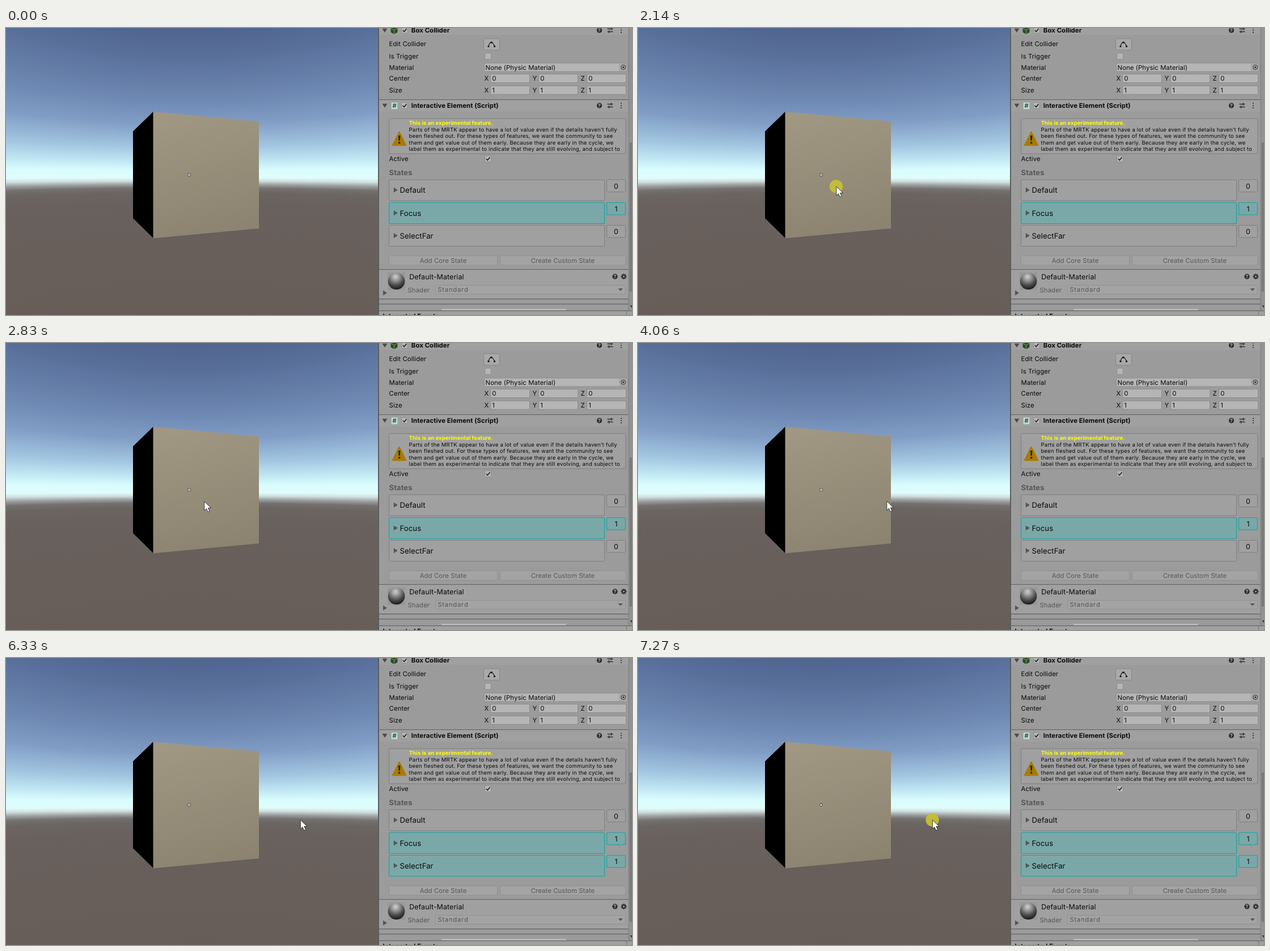
An HTML page with a canvas for the animation above (8000 ms loop, 1104 by 507 pixels).

```html
<!DOCTYPE html>
<html lang="en">
<head>
<meta charset="utf-8">
<title>Inspector states</title>
<style>
html, body { margin: 0; width: 100%; height: 100%; overflow: hidden; background: #9b9b9b; }
canvas, svg { position: absolute; left: 0; top: 0; display: block; }
text { font-family: Inter, Roboto, sans-serif; font-size: 11.4px; letter-spacing: .06px; fill: #0a0a0a; white-space: pre; text-rendering: geometricPrecision; }
.bold { font-weight: 700; }
.big { font-size: 13.2px; }
.note { font-size: 9.5px; letter-spacing: .2px; }
.dim { fill: #585858; }
.mid { text-anchor: middle; }
.field { fill: #b5b5b5; stroke: #8b8b8b; }
.button { fill: #a9a9a9; stroke: #868686; }
.off { fill: #a3a3a3; stroke: #919191; }
.box { fill: #a0a0a0; stroke: #7e7e7e; }
.on { fill: #7aa8a8; stroke: #1ba3a3; stroke-width: 1.2; }
</style>
</head>
<body>
<canvas id="sky" width="657" height="507"></canvas>
<svg id="stage" width="1104" height="507" viewBox="0 0 1104 507"></svg>
<script>
const LOOP = 8000, HORIZON = 259.5, CENTER = 323, FOCAL = 450;
const el = id => document.getElementById(id);

// Sky colours by height; each column is scaled for the camera's perspective.
function paintSky() {
  const g = el('sky').getContext('2d');
  const fill = g.createLinearGradient(0, -340, 0, 320);
  const stops = [[-340, '#4d628b'], [-259, '#586f9a'], [-160, '#6e89b3'], [-110, '#819dc5'],
    [-60, '#a2c6e0'], [-28, '#c2e8f4'], [-10, '#d9fdfd'], [6, '#e0fcfc'], [13, '#cfdfdf'],
    [20, '#a0a3a3'], [28, '#747170'], [38, '#6b6562'], [60, '#69615d'], [320, '#665c58']];
  for (const [y, c] of stops) fill.addColorStop((y + 340) / 660, c);
  g.fillStyle = fill;
  for (let x = 0; x < 657; x++) {
    const k = Math.hypot(FOCAL, x - CENTER) / Math.hypot(FOCAL, CENTER);
    g.setTransform(1, 0, 0, k, x, HORIZON);
    g.fillRect(0, -400, 1, 800);
  }
}

const text = (x, y, s, cls = '', more = '') => `<text x="${x}" y="${y}" class="${cls}" ${more}>${s}</text>`;
const rect = (x, y, w, h, cls, id = '') =>
  `<rect x="${x + .5}" y="${y + .5}" width="${w - 1}" height="${h - 1}" rx="2" class="${cls}" id="${id}"/>`;
const fillRect = (x, y, w, h, c) => `<rect x="${x}" y="${y}" width="${w}" height="${h}" fill="${c}"/>`;
const path = (d, fill = 'none', more = '') => `<path d="${d}" fill="${fill}" ${more}/>`;
const circle = (x, y, r, fill, more = '') => `<circle cx="${x}" cy="${y}" r="${r}" fill="${fill}" ${more}/>`;
const down = (x, y) => path(`M${x - 4.5} ${y - 3.5}h9l-4.5 7z`, '#4b4b4b');
const right = (x, y) => path(`M${x - 3.5} ${y - 4.5}v9l7-4.5z`, '#555');
const line = y => fillRect(658, y, 440, 1.3, '#646464');

const check = (x, y, ticked = true) => rect(x - 6, y - 6, 12, 12, 'field') +
  (ticked ? path(`M${x - 3.2} ${y}l2.4 2.5 4.3-5.2`, 'none', 'stroke="#222" stroke-width="1.6"') : '');

const help = (x, y) => circle(x, y, 4.7, '#303030') +
  text(x, y + 3, '?', 'bold mid', 'style="font-size:8.5px;fill:#b5b5b5"');

const headerIcons = y => help(1046.5, y) +
  path(`M1060.5 ${y - 2.5}h10M1060.5 ${y + 2.5}h10M1067.5 ${y - 5}v5M1063.5 ${y}v5`, 'none', 'stroke="#303030" stroke-width="1.3"') +
  [-4, 0, 4].map(d => circle(1085, y + d, 1.1, '#303030')).join('');

const vector = (y, name, value) => text(675.6, y + 4.2, name) +
  ['X', 'Y', 'Z'].map((axis, i) => {
    const x = 854 + 85 * i;
    return text(x - 10.5, y + 4.2, axis) + rect(x, y - 7.5, 70, 16, 'field') + text(x + 3.2, y + 4.2, value);
  }).join('');

const state = (y, name, value, cls) => rect(675, y, 381, 38, cls, name) + right(687.3, y + 18.7) +
  text(694.4, y + 23.6, name, 'big') + rect(1059, y, 34, 22.5, cls, name + 'Box') +
  text(1076, y + 16.2, value, 'mid', `id="${name}Value" style="font-size:12.4px"`);

function gear(x, y) {
  let d = '';
  for (let i = 0; i < 8; i++) {
    const a = i * Math.PI / 4;
    d += `M${x} ${y}L${x + 5 * Math.cos(a)} ${y + 5 * Math.sin(a)}`;
  }
  return path(d, 'none', 'stroke="#303030" stroke-width="2"') + circle(x, y, 3.6, '#303030') + circle(x, y, 1.6, '#a0a0a0');
}

const scene = () =>
  path('M224 182.5L260 147.5V371.5L224 336z', '#000') +
  path('M259.5 148L446 165V354L259.5 371.5z', 'url(#face)') +
  `<g id="ring">${circle(CENTER, HORIZON, 2.9, '#222')}${circle(CENTER, HORIZON, 2.2, '#fff')}${circle(CENTER, HORIZON, 1, '#222')}</g>` +
  `<g id="dot">${circle(CENTER, HORIZON, 2.4, '#222')}${circle(CENTER, HORIZON, 1.6, '#fff')}</g>`;

const colliderSection = () =>
  fillRect(658, 0, 440, 12, '#a0a0a0') + down(668, 4.5) +
  path('M684.5 -3l6 3.2v7.4l-6 3.4-6-3.4V.2z', '#2d4a26') +
  path('M678.5 .5l6 3.2 6-3.2M684.5 3.7V11', 'none', 'stroke="#7da06f" stroke-width="1"') +
  check(703, 4) + text(714.8, 8, 'Box Collider', 'bold') + headerIcons(4) +
  text(675.6, 31.5, 'Edit Collider') + rect(842, 18.5, 29, 21, 'button') +
  path('M851 32.5q1-6 4.5-7.5M857 25.5q2.5 1.5 4.5 7', 'none', 'stroke="#1b1b1b" stroke-width="1.2"') +
  [[851, 32.5], [856, 25.5], [861.5, 32.5]].map(([x, y]) => fillRect(x - 1.5, y - 1.5, 3, 3, '#1b1b1b')).join('') +
  text(675.6, 54.2, 'Is Trigger') + check(850, 50, false) +
  text(675.6, 73.7, 'Material') + rect(843, 61.5, 254, 16, 'field') + text(845.5, 73.7, 'None (Physic Material)') +
  fillRect(1081, 62.5, 15, 14, '#a6a6a6') +
  circle(1088.7, 69.3, 4, 'none', 'stroke="#2d2d2d"') + circle(1088.7, 69.3, 1.5, '#2d2d2d') +
  vector(88.5, 'Center', '0') + vector(109.3, 'Size', '1');

const note = ['Parts of the MRTK appear to have a lot of value even if the details haven’t fully',
  'been fleshed out. For these types of features, we want the community to see',
  'them and get value out of them early. Because they are early in the cycle, we',
  'label them as experimental to indicate that they are still evolving, and subject to'];

const elementSection = () =>
  line(126) + fillRect(658, 127.3, 440, 20, '#a0a0a0') + down(668, 137.2) +
  `<rect x="679" y="131" width="12" height="13" rx="1.5" fill="#c3d8d1" stroke="#7e9b90" stroke-width=".8"/>` +
  text(685, 141.3, '#', 'bold mid', 'style="fill:#1c5a48;font-size:11px"') +
  check(703, 137) + text(714.8, 141.2, 'Interactive Element (Script)', 'bold') + headerIcons(137) +
  rect(675, 159.5, 418.5, 63, 'box') +
  path('M693.5 184l11.5 23h-23z', '#a87c00', 'stroke="#a87c00" stroke-width="2.5" stroke-linejoin="round"') +
  path('M692 190h3.4l-.6 9h-2.2zM692.2 201.2h3v3h-3z', '#1e1a10') +
  text(710.7, 171.2, 'This is an experimental feature.', 'bold', 'style="font-size:9.5px;fill:#ff0"') +
  note.map((s, i) => text(710.6, 182.6 + 11.5 * i, s, 'note')).join('') +
  text(675.6, 235.3, 'Active') + check(850, 231) +
  text(675.6, 259.8, 'States', 'bold dim', 'style="font-size:13px"') +
  state(267.5, 'Default', 0, 'box') + state(308, 'Focus', 1, 'on') + state(348, 'SelectFar', 0, 'box') +
  rect(675, 402, 192, 17.5, 'off') + text(771, 415.2, 'Add Core State', 'mid dim') +
  rect(871, 402, 222.5, 17.5, 'off') + text(982, 415.2, 'Create Custom State', 'mid dim');

const materialSection = () =>
  line(426) + fillRect(658, 427.3, 440, 51, '#a0a0a0') +
  fillRect(673, 432, 31, 31, '#979797') + circle(688.5, 447.3, 14.8, 'url(#ball)') + right(668.5, 468) +
  text(711.2, 444.2, 'Default-Material', '', 'style="font-size:12.5px"') +
  text(708.5, 466.5, 'Shader', 'dim') + rect(757, 454, 336, 16.5, 'off') +
  text(761.3, 466.3, 'Standard', 'dim', 'style="letter-spacing:.7px"') +
  path('M1079.5 460h8.5l-4.2 4.5z', '#555') + help(1074, 439) + gear(1089.5, 439) +
  line(478) + line(487) + fillRect(768, 496, 219.5, 3, '#b9b9b9') +
  fillRect(658, 499.3, 446, 8, '#a0a0a0') + fillRect(658, 498.9, 446, 1.2, '#646464') +
  text(664.5, 513.2, 'Integrated Events', 'bold');

const scrollbar = () =>
  fillRect(1098, 0, 6, 499, '#929292') + fillRect(1097.5, 0, 1, 499, '#7f7f7f') +
  `<rect x="1099.5" y="202" width="8" height="264" rx="3" fill="#7a7a7a"/>` +
  path('M1100.5 490h6l-3 4z', '#333') + fillRect(1094, 500, 1, 7, '#777');

const pointer = () => `<g id="pointer">${circle(0, 0, 11.7, '#c6bf34', 'id="press"')}` +
  path('M.3 0V16L4 12.6 6.6 18.5 9.5 17.2 6.9 11.5H12z', '#fff', 'stroke="#252525" stroke-width=".9" stroke-linejoin="round"') + '</g>';

function build() {
  el('stage').innerHTML = `<defs>
    <linearGradient id="face" x1=".2" y1="0" x2=".4" y2="1"><stop stop-color="#a09883"/><stop offset="1" stop-color="#8c8470"/></linearGradient>
    <radialGradient id="ball" cx=".45" cy=".24" r=".74"><stop stop-color="#d0d0d0"/><stop offset=".32" stop-color="#959595"/><stop offset=".68" stop-color="#4c4c4c"/><stop offset="1" stop-color="#1c1c1c"/></radialGradient>
  </defs>` + scene() + fillRect(656.5, 0, 448, 507, '#9b9b9b') + fillRect(656, 0, 2, 507, '#5d5d5d') +
    colliderSection() + elementSection() + materialSection() + scrollbar() + pointer();
}

// Pointer positions: time, x, y. Each holds until the next.
const moves = [[440, 1091, 488], [517, 1010, 452], [593, 870, 398], [670, 690, 336], [747, 510, 284],
  [823, 375, 252], [900, 303, 243], [977, 318, 262], [1053, 346, 288], [1130, 361.5, 301],
  [1380, 354, 288], [1460, 349.5, 280], [3610, 356, 280], [3680, 362, 280],
  [3910, 385, 282], [3980, 418, 281], [4060, 438.5, 279.5], [4390, 490, 283], [4460, 519, 286]];

// Step values: the last entry whose time has passed.
const pressSteps = [[0, 0], [2070, .5], [2140, .94], [2670, .45], [2750, 0], [4840, .94], [6330, 0], [7190, .94]];
const dotSteps = [[0, 0], [2210, 1], [2750, 0], [4920, 1], [6330, 0], [7270, 1]];
const selectSteps = [[0, 0], [2210, 1], [2830, 0], [4920, 1], [6480, 0], [7270, 1]];
const at = (steps, t) => steps.findLast(s => s[0] <= t);

function draw() {
  const t = performance.now() % LOOP;
  const place = at(moves, t), dot = at(dotSteps, t)[1], selected = at(selectSteps, t)[1];
  const [, x, y] = place || [0, 0, 0];
  el('pointer').setAttribute('visibility', place ? 'visible' : 'hidden');
  el('pointer').setAttribute('transform', `translate(${x} ${y})`);
  el('press').setAttribute('opacity', at(pressSteps, t)[1]);
  el('ring').setAttribute('opacity', 1 - dot);
  el('dot').setAttribute('opacity', dot);
  for (const id of ['SelectFar', 'SelectFarBox']) el(id).setAttribute('class', selected ? 'on' : 'box');
  el('SelectFarValue').textContent = selected;
  requestAnimationFrame(draw);
}

paintSky();
build();
draw();
</script>
</body>
</html>
```
